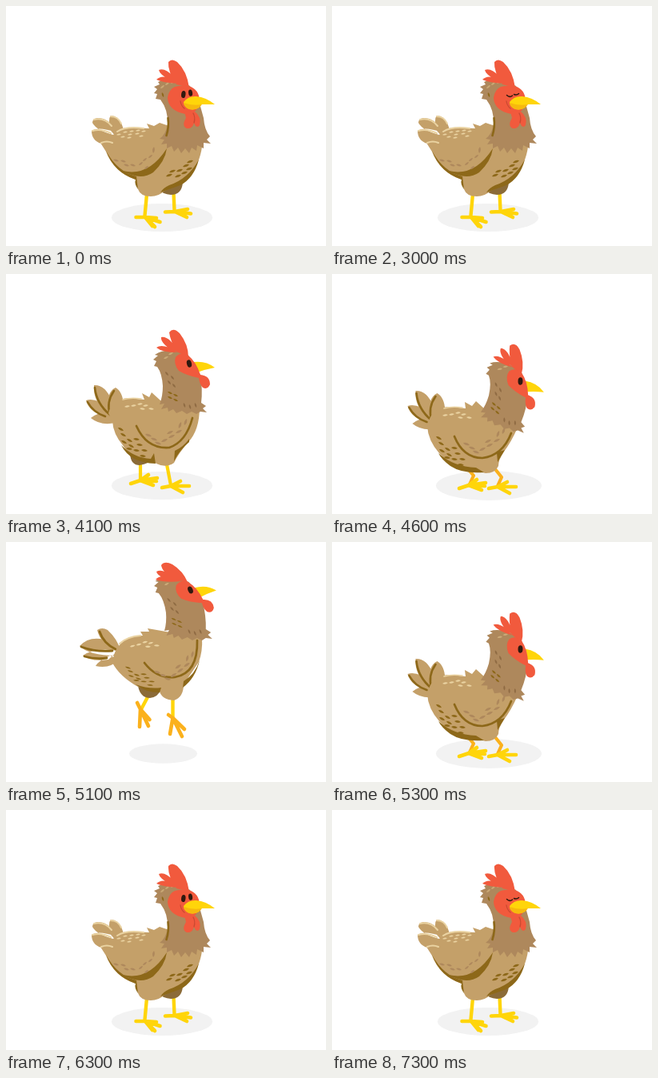
An HTML page that plays this animation: 400 px wide and 300 px high, repeating every 7.4 s.

```html
<!DOCTYPE html>
<html lang="en">
<head>
<meta charset="utf-8">
<title>Hen</title>
<style>
html, body { margin: 0; width: 100%; height: 100%; overflow: hidden; background: #fff; }
svg { display: block; width: 100vw; height: 100vh; }
</style>
</head>
<body>
<svg id="stage" viewBox="0 0 400 300"></svg>
<script>
const TAN = '#c4a069', BROWN = '#ae885c', DARK = '#8d6819', THIGH = '#8b6b38',
  CREAM = '#ead3a2', RED = '#f15a3d', YELLOW = '#ffd50a', AMBER = '#fbb11c', INK = '#30190f';

const fill = (color, d) => `<path fill="${color}" d="${d}"/>`;
const line = (color, width, d) =>
  `<path fill="none" stroke="${color}" stroke-width="${width}" stroke-linecap="round" stroke-linejoin="round" d="${d}"/>`;
const group = (transform, ...parts) => `<g transform="${transform}">${parts.join('')}</g>`;
const oval = (color, x, y, rx, ry, tilt = 0) =>
  `<ellipse fill="${color}" cx="${x}" cy="${y}" rx="${rx}" ry="${ry}" transform="rotate(${tilt} ${x} ${y})"/>`;
const shadow = (x, rx, ry) => oval('#f2f2f2', x, 264.5, rx, ry);

// small leaf-shaped feather marks, all pointing along (dx, dy)
const ticks = (color, dx, dy, points) => fill(color, points.split(' ').map(p =>
  `M${p}q${dx / 2 + dy * .35},${dy / 2 - dx * .35} ${dx},${dy}q${-dx / 2 - dy * .35},${-dy / 2 + dx * .35} ${-dx},${-dy}`).join(''));

const foot = (color, x, y, ...toes) => line(color, 4.6, toes.map(t => `M${x},${y}L${t}`).join(''));

// ---- front view ----
const frontBody =
  line(YELLOW, 4.4, 'M176,235L173.5,262M209.5,233L210.5,256') +
  foot(YELLOW, 174, 264, '162.5,264', '183,275', '186,276', '192.5,270', '188,265') +
  foot(YELLOW, 211, 257, '199,257.5', '226,264', '231,259.5', '227,254') +
  fill(THIGH, 'M191,230Q200,221 221,220Q220,236 206,236Q196,235 191,230Z') +
  fill(TAN, 'M131,156Q127,141 131,137Q143,138 147,155L140,166ZM138,162Q113,156 108,146Q108,141 114,140Q128,140 135,153ZM138,158Q115,150 107,156Q107,168 119,172L136,172Z') +
  line(CREAM, 2, 'M131,138Q140,138 144,147M110,142Q123,139 132,150M108,156Q119,153 131,159') +
  fill(TAN, 'M118,171Q126,171 132,164Q138,153 152,152L179,153L176,147L185,150L192,146L204,150L246,155Q247,183 237,201Q230,215 220,222L198,231Q191,238 181,238Q168,238 165,229L162,217Q135,208 125,182Z') +
  line(CREAM, 2, 'M139,157Q150,150 172,153M119,171Q126,168 133,171') +
  fill(DARK, 'M125,181Q139,207 163,213L165,229Q160,222 162,217Q135,208 125,181Z') +
  fill(DARK, 'M146,206Q178,214 201,178Q199,194 184,208Q168,219 146,206Z') +
  fill(DARK, 'M241,192Q235,215 218,224L193,233Q197,227 204,224Q228,216 241,192Z') +
  ticks(CREAM, 6, -1, '138,161 146,158 154,157 162,156 143,164 152,161 161,160 169,157 151,165 166,163') +
  ticks(BROWN, 7, 2, '134,192 143,193 147,198 155,198') +
  ticks(BROWN, 5, -4, '166,199 171,194 178,190 173,204') +
  ticks(BROWN, 1, -8, '184,184') +
  ticks(DARK, 8, -3, '200,213 204,208 213,207 221,201 211,214 219,210 225,205 226,196');

const frontHead =
  fill(BROWN, 'M214,92Q200,90 190,95L192,98L185,101L189,104L185,109L189,110L187,116L193,117Q203,130 202,148Q200,160 192,166L198,167L194,173L201,172L201,178L207,175L210,182L215,177L219,184L224,178L229,184L232,177L238,181L239,174L247,178L247,171L256,172L251,167L255,163Q248,155 247,140L242,122L230,100Z') +
  line(DARK, 2.6, 'M202.5,140Q204,151 200.5,162') +
  ticks('#c9a875', 5, -4, '193,103 199,99 206,97') +
  ticks(DARK, 2, 6, '195,108') +
  fill(RED, 'M188,92Q194,86 204,90L215,97Q196,96 188,92ZM191,80Q199,77 209,88L216,97L206,93Q192,86 191,80ZM203,70Q207,65 214,70Q226,81 229,102L213,98Q202,82 203,70Z') +
  fill(RED, 'M202,115Q204,101 216,100Q236,97 241,112Q243,122 237,131L224,135Q203,131 202,115Z') +
  fill(RED, 'M223,132L235,131Q245,139 242,149Q238,154 235,146Q233,154 226,153Q219,150 225,140Z') +
  line('#c94a32', 1.3, 'M234,134Q237,139 235,146M218,119Q219,125 223,128') +
  fill(YELLOW, 'M222,120Q228,112 238,113Q250,114 261,123L244,123Q240,131 229,129Q222,126 222,120Z') +
  fill('#f6b90e', 'M222,121Q233,125 245,123Q240,131 229,129Q223,127 222,121Z');

const openEyes = oval(INK, 221.8, 110.5, 2.7, 4.6, 8) + oval(INK, 230.6, 108.6, 2.5, 4.2, -8);
const shutEyes = line(INK, 1.5, 'M218.5,111.5Q222,115 225.5,112M227.5,110.5Q231,112 233.5,109.5');
const front = eyes => shadow(195, 63, 17.5) + frontBody + frontHead + eyes;

// ---- side view, upright coordinates ----
const comb = fill(RED, 'M188,92Q193,88 204,92L214,98Q195,98 188,92ZM194,79Q204,77 215,97L207,95Q193,86 194,79ZM204,73Q209,66 217,74Q228,88 228,104L213,97Q205,82 204,73Z');

const face =
  fill(YELLOW, 'M234,110Q250,108 261,117Q250,119 239,123Z') +
  fill(RED, 'M212,104Q218,97 227,101Q238,110 243,126Q255,127 255,138Q252,145 246,142Q242,138 241,130Q226,127 216,121Q209,112 212,104Z') +
  oval(INK, 229, 112, 3, 4.7, -15);

const neck =
  fill(BROWN, 'M213,96Q196,94 186,101L190,102L184,107L188,109L185,115L189,116Q195,124 196,140Q196,153 192,163L198,162L194,169L202,167L203,172L209,169L213,174L220,171L226,175L232,172L238,175L243,172L251,173L246,168L250,165L244,161Q246,145 243,126L228,102Z') +
  ticks('#cbaa78', 6, -3, '197,106 203,101') +
  ticks('#8f6b43', 4, 5, '199,122 206,127 202,133 208,137') +
  ticks('#8f6b43', 2, 6, '222,161 229,163 236,161') +
  ticks(DARK, 6, 3, '202,147 209,150 202,153 209,156');

const tail =
  fill(TAN, 'M130,178Q108,160 110,139Q124,138 132,158L136,172ZM128,174Q124,148 137,142Q146,147 147,164ZM130,180Q104,174 100,158Q112,154 130,168ZM106,180Q115,172 130,173L137,186Q118,190 106,180Z') +
  line(DARK, 2.6, 'M111,142Q113,162 130,176M135,146Q125,160 130,176M102,160Q109,173 124,178');

const wingMarks =
  ticks(CREAM, 7, -1, '148,166 156,165 164,163 171,165') +
  ticks(CREAM, 7, 1, '167,168 178,168') +
  ticks(BROWN, 8, 3, '174,200 181,205 186,210') +
  ticks(BROWN, 8, -4, '194,210 203,205 201,200 212,199') +
  ticks(BROWN, 3, -8, '216,193 223,189');
const bellyMarks =
  ticks(DARK, 7, 4, '140,192 143,199 151,206 144,208 153,213') +
  ticks(DARK, 8, 1, '159,206 163,213 150,218 159,220 169,220 167,227');

const backFoot = foot(YELLOW, 168, 258, '156,262', '189,255', '188,259', '184,264', '178,251');
const frontFoot = foot(YELLOW, 206, 265, '195,267', '229,265', '221,273', '218,259');

const stand = shadow(195, 63, 17.5) +
  line(YELLOW, 4.2, 'M168,236L168,257M201,238L206,264') + backFoot + frontFoot +
  fill(THIGH, 'M155,225Q156,239 167,239Q179,237 184,231Z') + tail +
  fill(TAN, 'M128,174Q132,157 152,155L173,157L170,149L179,154L182,148L193,158L242,166Q242,195 228,210Q215,225 210,236Q200,243 188,237L183,233Q155,231 146,214Q134,200 133,184Z') +
  line(CREAM, 1.6, 'M146,157Q156,154 169,156') +
  fill(DARK, 'M144,214Q160,230 181,231L185,224L187,237Q155,236 144,214ZM229,206Q222,216 211,221L210,234Q217,220 229,210Z') +
  line(DARK, 2.7, 'M163,190Q176,219 204,217Q225,210 233,180') +
  wingMarks + bellyMarks + neck + comb + face;

const crouch = shadow(196, 66, 18.5) +
  line(AMBER, 4.2, 'M172,246L177,252L172,263M204,244L212,254L207,265') +
  group('translate(3 6)', backFoot) + group('translate(1 1)', frontFoot) +
  group('translate(-5.5 7)', tail) +
  fill(TAN, 'M121,184Q126,166 148,166L167,168L166,160L175,165L180,159L190,168L232,192Q224,210 215,222Q208,232 208,240Q204,249 192,249L180,246Q150,243 134,224Q120,208 119,190Z') +
  line(CREAM, 1.6, 'M140,168Q150,165 163,167') +
  fill(DARK, 'M133,224Q152,241 180,242L190,248Q163,250 148,240Q137,232 133,224ZM216,220L206,223L207,235Z') +
  line(DARK, 2.7, 'M153,203Q164,230 188,230Q213,227 224,199') +
  group('translate(-10 11)', wingMarks, bellyMarks) +
  group('translate(235.5 134) rotate(16) translate(-229 -112)', neck, comb, face);

const spreadTail =
  fill(TAN, 'M140,136Q118,128 114,110Q120,106 127,110Q139,121 143,135ZM137,142Q104,142 92,130Q102,119 118,121Q131,125 140,137ZM140,136Q110,132 96,142Q106,150 128,147ZM112,155Q116,148 130,142L141,147Q130,159 112,155Z') +
  line(DARK, 2.8, 'M117,112Q122,127 137,134M94,131Q113,138 133,136M98,143Q112,147 126,145');
const flatComb = fill(RED, 'M187,47Q192,41 202,44L220,49Q198,51 187,47ZM188,37Q196,33 207,43L216,48Q190,46 188,37ZM194,29Q198,23 208,28Q221,36 227,50L212,47Q195,38 194,29Z');

const jump = shadow(196.5, 42.5, 12.3) +
  line(YELLOW, 4.4, 'M178,192L169,209M208.5,194L208.5,220') +
  foot(AMBER, 168, 209, '164,201', '167,231', '178,230', '179.5,222') +
  foot(AMBER, 208.5, 220, '203,216', '205,240', '220,243', '223,234') +
  fill(THIGH, 'M165,180Q168,195 180,195Q190,194 194,184Z') + spreadTail +
  fill(TAN, 'M133,151Q135,131 150,122Q160,117 171,117L168,112L179,112L177,108L200,112L245,120Q246,136 241,150L222,178Q222,194 210,198Q195,197 192,187L165,181Q142,168 133,151Z') +
  line(CREAM, 2, 'M142,127Q152,118 168,117') +
  fill(DARK, 'M162,178Q178,184 194,182L192,188Q174,188 162,178ZM242,148Q236,166 222,174L221,182Q237,170 242,148Z') +
  line(DARK, 2.7, 'M173,151Q188,171 211,169Q240,164 239,123') +
  group('translate(197 155) rotate(-7) translate(-187 -195)', wingMarks) +
  group('translate(9 31) scale(1 .65)', bellyMarks) +
  group('translate(230.5 60) skewX(5) translate(-229 -112)', neck) + flatComb +
  group('translate(230.5 60) rotate(-8) translate(-229 -112)', face);

const poses = { open: front(openEyes), shut: front(shutEyes), stand, crouch, jump };
const steps = [[0, 'open'], [3000, 'shut'], [3100, 'open'], [4100, 'stand'], [4600, 'crouch'],
  [5100, 'jump'], [5300, 'crouch'], [5800, 'stand'], [6300, 'open'], [7300, 'shut']];
const LOOP = 7400;

const stage = document.getElementById('stage');
stage.innerHTML = Object.entries(poses).map(([name, art]) => `<g id="${name}">${art}</g>`).join('');
const layers = [...stage.children];

function show(time) {
  const t = time % LOOP;
  const name = steps.findLast(([at]) => at <= t)[1];
  for (const layer of layers) layer.style.display = layer.id === name ? '' : 'none';
}

const start = performance.now();
function tick(now) {
  show(Math.max(0, now - start));
  requestAnimationFrame(tick);
}
show(0);
requestAnimationFrame(tick);
</script>
</body>
</html>
```
